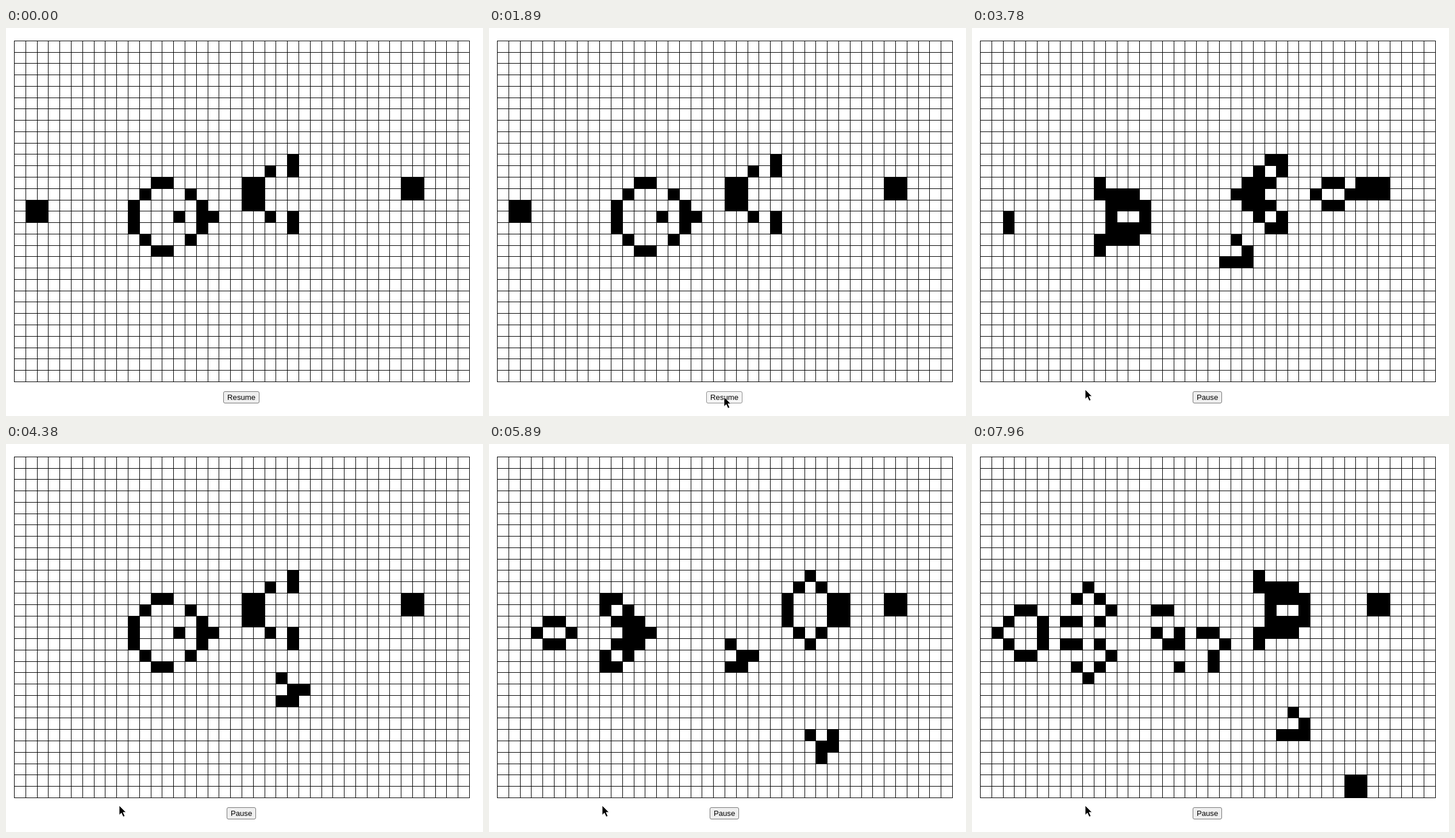
An HTML page that plays this animation: 830 by 675 pixels, repeating every 8000 ms.

```html
<!DOCTYPE html>
<html lang="en">
<head>
<meta charset="utf-8">
<title>Game of Life</title>
<style>
  html, body { margin: 0; width: 100%; height: 100%; overflow: hidden; background: #fff; }
  svg { display: block; }
  text { font: 13.2px "Liberation Sans", Arial, sans-serif; text-anchor: middle; }
</style>
</head>
<body>
<svg width="830" height="675" viewBox="0 0 830 675">
  <rect width="830" height="675" fill="#fff"/>
  <path id="grid" stroke="#000" fill="none" shape-rendering="crispEdges"/>
  <path id="cells" shape-rendering="crispEdges"/>
  <rect id="button" y="632.5" height="20" rx="2.5"/>
  <text id="label" x="409.6" y="647"></text>
  <path id="cursor" d="M0 0V16.4L3.8 12.9L6.9 19.6L9.8 18.3L6.8 11.8H11.8Z"
        stroke="#fff" stroke-width=".8"/>
</svg>
<script>
const COLS = 40, ROWS = 30, LOOP = 8000;
const ENTER = 80, PRESS = 1860, CLICK = 1950;
const CLOCK = 1851, STEP = 83.5;

// Glider gun in run-length notation: b = dead, o = alive, $ = next row.
const GUN = "23bo$21bobo$11b2o6b2o12b2o$10bo3bo4b2o12b2o$2o7bo5bo3b2o$" +
            "2o7bo3bob2o4bobo$9bo5bo7bo$10bo3bo$11b2o";
const GUN_X = 1, GUN_Y = 10;

const POINTER = [
  { t: ENTER, x: 702, y: 664 },
  { t: 880, x: 289, y: 430 },
  { t: 1150, x: 271, y: 336 },
  { t: 1680, x: 408, y: 650 },
  { t: 1890, x: 409, y: 642 },
  { t: 2560, x: 409, y: 642 },
  { t: 2760, x: 283, y: 632 },
  { t: 3500, x: 197, y: 629 }
];

const el = id => document.getElementById(id);
const lineX = i => Math.round(14 + 19.8 * i);
const lineY = i => Math.round(21.75 + 19.77 * i);
const mix = (a, b, f) => Math.round(a + (b - a) * f);

function decode(rle) {
  const world = Array(COLS * ROWS).fill(0);
  rle.split("$").forEach((row, dy) => {
    let x = GUN_X;
    for (const [, count, state] of row.matchAll(/(\d*)([bo])/g))
      for (let n = count || 1; n > 0; n--, x++)
        world[(GUN_Y + dy) * COLS + x] = state === "o" ? 1 : 0;
  });
  return world;
}

function nextGeneration(world) {
  const at = (x, y) => x >= 0 && y >= 0 && x < COLS && y < ROWS ? world[y * COLS + x] : 0;
  return world.map((alive, i) => {
    const x = i % COLS, y = (i - x) / COLS;
    let n = -alive;
    for (let dy = -1; dy <= 1; dy++)
      for (let dx = -1; dx <= 1; dx++) n += at(x + dx, y + dy);
    return n === 3 || (alive && n === 2) ? 1 : 0;
  });
}

function worldPath(world) {
  let d = "";
  world.forEach((alive, i) => {
    if (!alive) return;
    const x = i % COLS, y = (i - x) / COLS;
    d += `M${lineX(x)} ${lineY(y)}H${lineX(x + 1) + 1}V${lineY(y + 1) + 1}H${lineX(x)}Z`;
  });
  return d;
}

function gridPath() {
  let d = "";
  for (let i = 0; i <= COLS; i++) d += `M${lineX(i) + .5} ${lineY(0)}V${lineY(ROWS) + 1}`;
  for (let i = 0; i <= ROWS; i++) d += `M${lineX(0)} ${lineY(i) + .5}H${lineX(COLS) + 1}`;
  return d;
}

const generationAt = t => t < CLICK ? 0 : Math.floor((t - CLOCK) / STEP);

function pointerAt(t) {
  const i = POINTER.findIndex(p => p.t > t);
  if (i < 0) return POINTER[POINTER.length - 1];
  if (i === 0) return POINTER[0];
  const a = POINTER[i - 1], b = POINTER[i], f = (t - a.t) / (b.t - a.t);
  return { x: mix(a.x, b.x, f), y: mix(a.y, b.y, f) };
}

function setAttrs(id, attrs) {
  for (const name in attrs) el(id).setAttribute(name, attrs[name]);
}

function drawButton(t, { x, y }) {
  const running = t >= CLICK;
  const left = running ? 384.5 : 378.5, width = running ? 50 : 62;
  const over = t >= ENTER && x >= left && x <= left + width && y >= 632 && y <= 653;
  const [fill, stroke] =
    t >= PRESS && !running ? ["#f5f5f5", "#8d8d8d"] :
    over ? ["#e5e5e5", "#4f4f4f"] : ["#efefef", "#767676"];
  setAttrs("button", { x: left, width, fill, stroke });
  el("label").textContent = running ? "Pause" : "Resume";
}

const frames = [];
for (let world = decode(GUN); frames.length <= generationAt(LOOP); world = nextGeneration(world))
  frames.push(worldPath(world));
setAttrs("grid", { d: gridPath() });

function render(t) {
  const tip = pointerAt(t);
  setAttrs("cells", { d: frames[generationAt(t)] });
  drawButton(t, tip);
  setAttrs("cursor", {
    transform: `translate(${tip.x} ${tip.y})`,
    visibility: t < ENTER ? "hidden" : "visible"
  });
}

const start = performance.now();
function tick() {
  render((performance.now() - start) % LOOP);
  requestAnimationFrame(tick);
}
tick();
</script>
</body>
</html>
```
